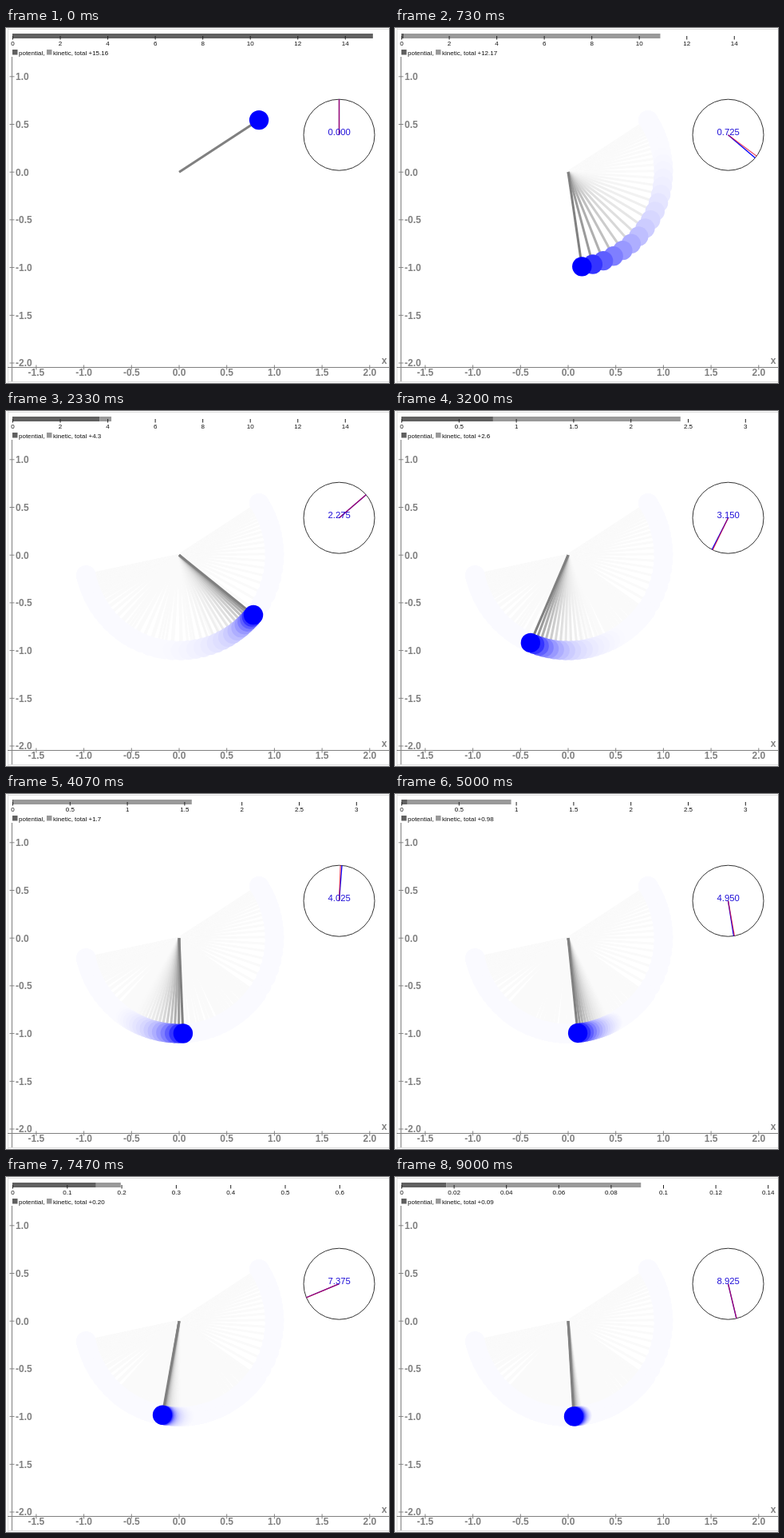
These frames come from a looping animation (480x444 px, 9.07 s). An HTML page with a canvas:

```html
<!DOCTYPE html>
<html lang="en">
<head>
<meta charset="utf-8">
<title>Damped pendulum</title>
<style>
  html, body { margin: 0; width: 100%; height: 100%; overflow: hidden; background: #fff; }
  canvas { display: block; }
</style>
</head>
<body>
<canvas id="stage" width="480" height="444"></canvas>
<script>
const ctx = document.getElementById('stage').getContext('2d');
const FONT = '"Liberation Sans", Arial, sans-serif';
const LOOP = 9070, FRAME = 200 / 3, LAST_FRAME = 135;
const STEP = 0.025, GRAVITY = 9.81, DAMPING = 0.6, START_ANGLE = 2.1477;
const ORIGIN = { x: 217, y: 180.2 }, UNIT = 119.4, BOB_RADIUS = 12.2;
const FADE = 9.2, RESIDUE = 5;

// [frame, clock seconds] and [readout number, simulation step]
const CLOCK = [[0, 0], [20, 1.278], [35, 2.274], [61, 4.012], [89, 5.874], [112, 7.374], [135, 8.924]];
const REFRESH = [[0, 0], [7, 87], [13, 159], [19, 234], [24, 294], [29, 356], [30, 368]];

// Energy scales: used while energy is above `min`
const SCALES = [
  { min: 3.144, perUnit: 29.77, tick: 2 },
  { min: 0.661, perUnit: 143.6, tick: 0.5 },
  { min: 0.1377, perUnit: 683, tick: 0.1 },
  { min: 0, perUnit: 3280, tick: 0.02 }
];

function interpolate(points, x) {
  let i = 1;
  while (i < points.length - 1 && x > points[i][0]) i++;
  const [x0, y0] = points[i - 1], [x1, y1] = points[i];
  return y0 + (y1 - y0) * (x - x0) / (x1 - x0);
}

function simulate(count) {
  const accel = (a, v) => -GRAVITY * Math.sin(a) - DAMPING * v;
  const states = [];
  let a = START_ANGLE, v = 0;
  for (let i = 0; i <= count; i++) {
    const potential = GRAVITY * (1 - Math.cos(a));
    states.push({
      x: ORIGIN.x + UNIT * Math.sin(a),
      y: ORIGIN.y + UNIT * Math.cos(a),
      potential,
      total: potential + v * v / 2
    });
    const h = STEP;
    const k1 = accel(a, v);
    const v2 = v + h / 2 * k1, k2 = accel(a + h / 2 * v, v2);
    const v3 = v + h / 2 * k2, k3 = accel(a + h / 2 * v2, v3);
    const v4 = v + h * k3, k4 = accel(a + h * v3, v4);
    a += h / 6 * (v + 2 * v2 + 2 * v3 + v4);
    v += h / 6 * (k1 + 2 * k2 + 2 * k3 + k4);
  }
  return states;
}

const states = simulate(362);
const refreshSteps = Array.from({ length: 31 }, (_, k) => Math.round(interpolate(REFRESH, k)));

function line(x1, y1, x2, y2, color, width = 1) {
  ctx.strokeStyle = color;
  ctx.lineWidth = width;
  ctx.beginPath();
  ctx.moveTo(x1, y1);
  ctx.lineTo(x2, y2);
  ctx.stroke();
}

function disc(x, y, r) {
  ctx.beginPath();
  ctx.arc(x, y, r, 0, 2 * Math.PI);
}

function rect(x, y, w, h, color) {
  ctx.fillStyle = color;
  ctx.fillRect(x, y, w, h);
}

function text(str, x, y, size, color, align = 'left', weight = 'normal') {
  ctx.font = `${weight} ${size}px ${FONT}`;
  ctx.fillStyle = color;
  ctx.textAlign = align;
  ctx.fillText(str, x, y);
}

// Fades towards white but never quite reaches it
function faded(rgb, strength) {
  const mix = c => c === 255 ? 255 : 255 - Math.max(RESIDUE, Math.round((255 - c) * strength));
  return `rgb(${rgb.map(mix)})`;
}

function drawPendulum(now) {
  for (let i = 0; i <= now; i++) {
    const { x, y } = states[i];
    const strength = Math.exp(-FADE * STEP * (now - i));
    line(ORIGIN.x, ORIGIN.y, x, y, faded([128, 128, 128], strength), 3);
    ctx.fillStyle = faded([0, 0, 255], strength);
    disc(x, y, BOB_RADIUS);
    ctx.fill();
  }
}

function drawAxes() {
  const gray = '#808080';
  line(2.5, 0, 2.5, 444, '#ddd');
  line(2, 1.5, 480, 1.5, '#ddd');
  line(2, 442.5, 480, 442.5, '#ddd');
  line(7.5, 36, 7.5, 442, gray);
  line(2, 424.5, 480, 424.5, gray);
  for (let v = -1.5; v <= 2; v += 0.5) {
    const x = ORIGIN.x + v * UNIT;
    line(x, 421.5, x, 427.5, gray);
    text(v.toFixed(1), x, 434.5, 12, gray, 'center', 'bold');
  }
  for (let v = -2; v <= 1; v += 0.5) {
    const y = ORIGIN.y - v * UNIT;
    line(4.5, y, 10.5, y, gray);
    text(v.toFixed(1), 12, y + 4.3, 12, gray, 'left', 'bold');
  }
  text('x', 474, 420, 12, gray, 'center', 'bold');
}

function drawEnergy(now) {
  const left = 8.5, dark = '#606060', light = '#999';
  const { potential, total } = states[now];
  const { perUnit, tick } = SCALES.find(s => total >= s.min);
  rect(left - 0.5, 7, potential * perUnit + 0.5, 6, dark);
  rect(left + potential * perUnit, 7, (total - potential) * perUnit, 6, light);
  for (let i = 0; left + i * tick * perUnit < 472; i++) {
    const x = left + i * tick * perUnit;
    line(x, 10, x, 14.5, '#222');
    text(String(+(i * tick).toFixed(2)), x, 21.7, 8, '#111', 'center');
  }
  const shown = states[refreshSteps.filter(s => s <= now).pop()].total;
  const digits = shown >= 1 && shown < 10 ? 1 : 2;
  rect(8, 27, 6.5, 6.5, dark);
  text('potential,', 16, 33.5, 8, '#111');
  rect(51, 27, 6.5, 6.5, light);
  text(`kinetic, total +${shown.toFixed(digits)}`, 59, 33.5, 8, '#111');
}

function drawClock(simTime, clockTime) {
  const x = 417.5, y = 133.7, r = 44.5;
  ctx.strokeStyle = '#333';
  ctx.lineWidth = 1;
  disc(x, y, r);
  ctx.stroke();
  const hand = (time, color) => {
    const a = Math.PI * time;
    line(x, y, x + r * Math.sin(a), y - r * Math.cos(a), color, 1.3);
  };
  hand(simTime, '#00f');
  hand(clockTime, 'rgba(225,0,40,.7)');
  text(simTime.toFixed(3), 417.7, 133.7, 11.3, '#2010d8', 'center');
}

function draw(ms) {
  const frame = Math.min(LAST_FRAME, Math.floor((ms + 3.4) / FRAME));
  const clockTime = interpolate(CLOCK, frame);
  const now = Math.ceil(clockTime / STEP - 1e-6);
  rect(0, 0, 480, 444, '#fff');
  drawPendulum(now);
  drawAxes();
  drawEnergy(now);
  drawClock(now * STEP, clockTime);
}

const start = performance.now();
function tick() {
  draw((performance.now() - start) % LOOP);
  requestAnimationFrame(tick);
}
tick();
</script>
</body>
</html>
```
